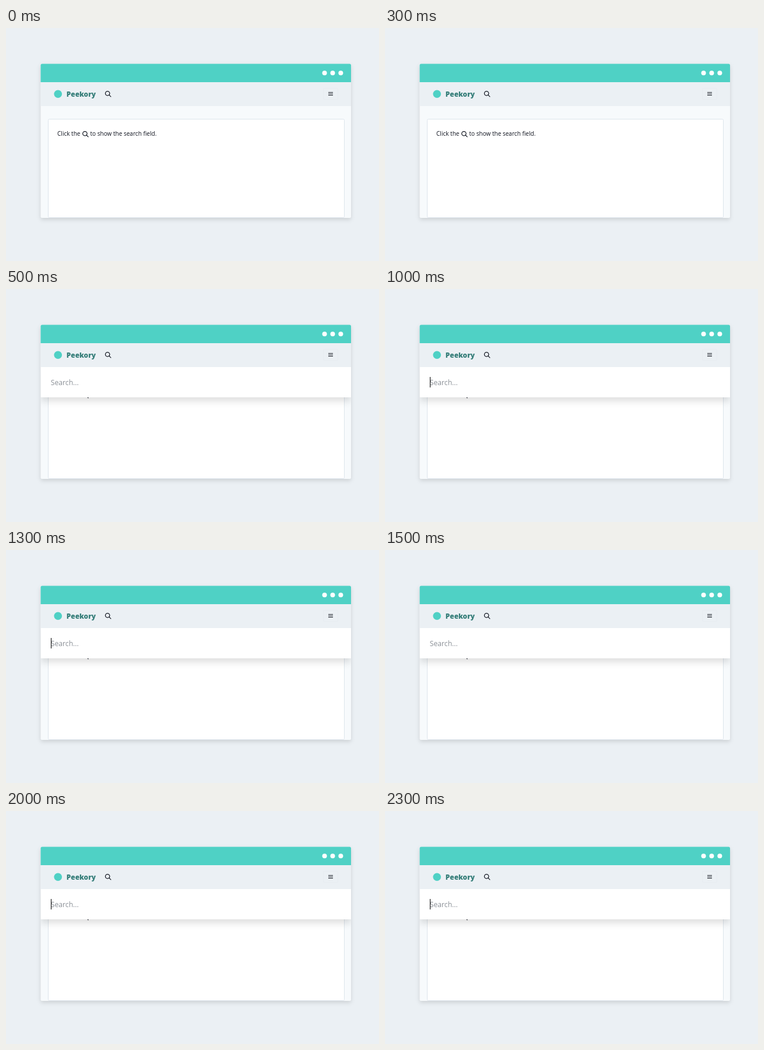
Recreate the animation shown at these times as an HTML page. Size 640 by 400 pixels, loop 2500 ms.

```html
<!DOCTYPE html>
<html lang="en">
<head>
<meta charset="utf-8">
<title>Search panel</title>
<style>
  html, body { margin: 0; width: 100%; height: 100%; overflow: hidden; background: #ebf0f4; }
  svg { display: block; width: 640px; height: 400px; }
  text { font-family: "Open Sans", "Noto Sans", sans-serif; font-size: 10.05px; fill: #111520; }
  .brand { font-size: 11.9px; font-weight: 800; fill: #347d78; }
  .hint { font-size: 12.2px; fill: #8b9097; }
  .window { fill: #f7fafc; filter: drop-shadow(0 3px 3.5px rgba(0, 0, 0, .13)); }
  .card { fill: #fff; stroke: #dde5ec; }
  .sheet { fill: #fff; filter: drop-shadow(0 7px 6px rgba(0, 0, 0, .12)); }
  .lens { fill: none; stroke: #111520; stroke-width: 1.25; stroke-linecap: round; }
  .panel { animation: open 2.5s step-end infinite; }
  .caret { animation: blink 2.5s step-end infinite; }
  @keyframes open {
    0% { visibility: hidden; }
    20%, 100% { visibility: visible; }
  }
  @keyframes blink {
    0%, 60% { opacity: 0; }
    40%, 80%, 100% { opacity: 1; }
  }
</style>
</head>
<body>
<svg viewBox="0 0 640 400">
  <defs>
    <clipPath id="body"><rect x="59.5" y="134" width="532.5" height="192"/></clipPath>
    <g id="lens" class="lens">
      <circle cx="4.4" cy="4.4" r="3.7"/>
      <path d="M7.1 7.1L10.1 10.1"/>
    </g>
  </defs>

  <rect class="window" x="59.5" y="61.5" width="532.5" height="264.5" rx="2.5"/>
  <path d="M59.5 93V64a2.5 2.5 0 0 1 2.5-2.5H589.5a2.5 2.5 0 0 1 2.5 2.5V93Z" fill="#4fd1c5"/>
  <g fill="#fff">
    <circle cx="546.6" cy="77.2" r="4"/>
    <circle cx="560.5" cy="77.2" r="4"/>
    <circle cx="574.4" cy="77.2" r="4"/>
  </g>

  <rect x="59.5" y="93" width="532.5" height="41" fill="#ebf0f4"/>
  <circle cx="89.2" cy="113.2" r="6.8" fill="#4fd1c5"/>
  <text class="brand" x="103.8" y="118.2">Peekory</text>
  <use href="#lens" x="169.8" y="107.8"/>
  <rect x="544.5" y="103.5" width="25" height="19" rx="2" fill="none" stroke="#e7ecf1"/>
  <path d="M553 110.5h8M553 113h8M553 115.5h8" stroke="#20242c"/>

  <g clip-path="url(#body)">
    <rect class="card" x="72.5" y="156.5" width="508" height="169" rx="2"/>
    <text x="88" y="185">Click the</text>
    <use href="#lens" x="131" y="176.8"/>
    <text x="144.5" y="185">to show the search field.</text>
    <g class="panel">
      <rect class="sheet" x="59.5" y="134" width="532.5" height="52"/>
      <text class="hint" x="76.8" y="165.2">Search...</text>
      <rect class="caret" x="77" y="151" width="1" height="18"/>
    </g>
  </g>
</svg>
</body>
</html>
```
